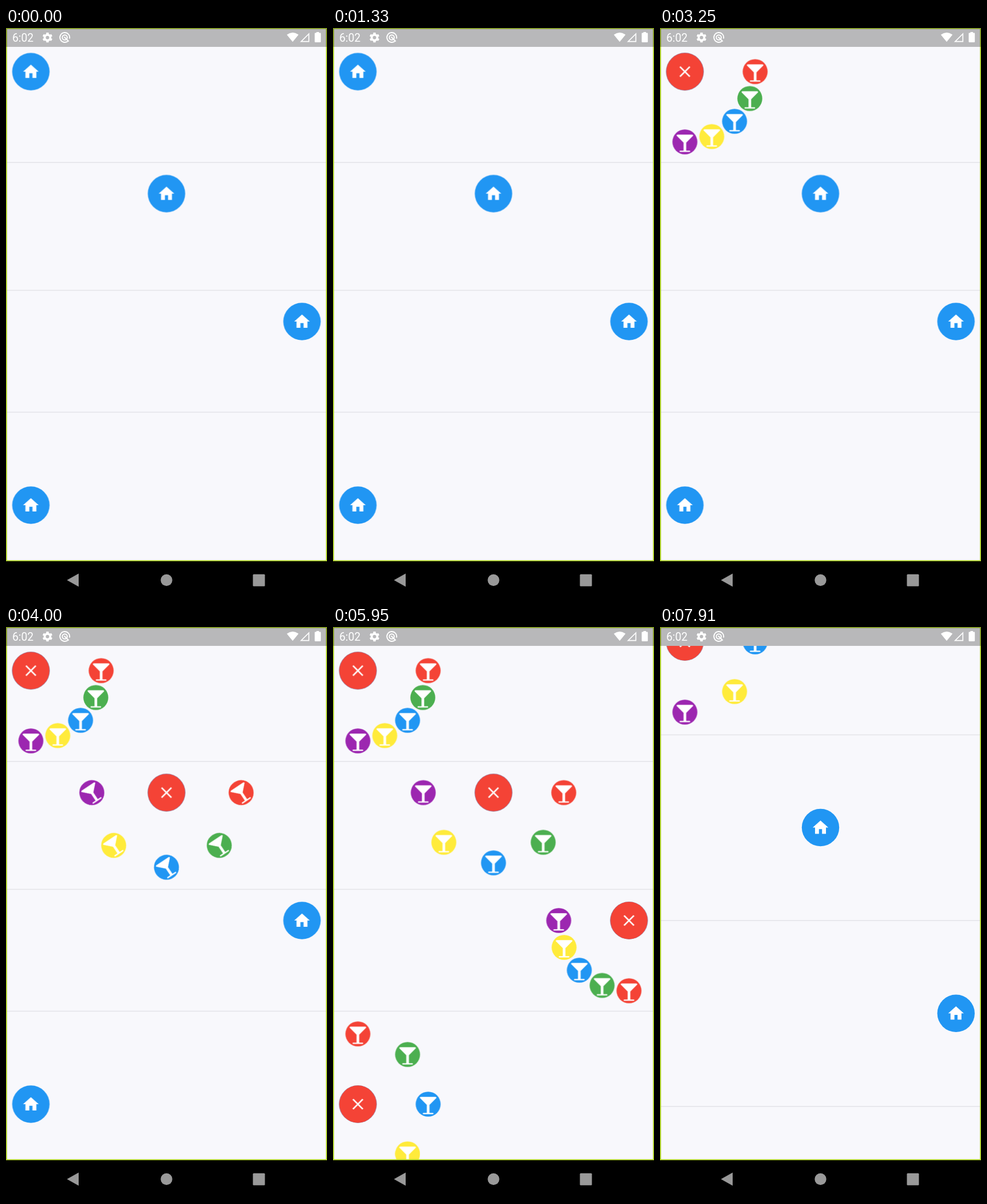
Animation of 561 by 998 pixels, one loop 8 s. Source, as an HTML page:

```html
<!DOCTYPE html>
<html lang="en">
<head>
<meta charset="utf-8">
<title>Circular menus</title>
<style>
  html, body { margin: 0; width: 100%; height: 100%; overflow: hidden; background: #000; }
  svg { display: block; width: 561px; height: 998px; }
  .scroll { animation: scroll 8s infinite; }
  @keyframes scroll {
    0%, 89% { transform: translateY(0); animation-timing-function: cubic-bezier(.4, .1, .45, 1); }
    98.9%, 100% { transform: translateY(-808px); }
  }
</style>
</head>
<body>
<svg viewBox="0 0 561 998">
  <defs>
    <clipPath id="view"><rect y="33" width="561" height="899"/></clipPath>
    <g id="home">
      <circle r="32.7" fill="#2196f3"/>
      <path transform="scale(1.364) translate(-12 -12)" fill="#fff" d="M10 20v-6h4v6h5v-8h3L12 3 2 12h3v8z"/>
    </g>
    <g id="close">
      <circle r="32.7" fill="#f44336"/>
      <path d="M-8.6-8.6 8.6 8.6M8.6-8.6-8.6 8.6" stroke="#fff" stroke-width="2.7"/>
    </g>
    <path id="glass" transform="scale(1.168) translate(0 -13)" fill="#fff"
      d="M-11 2H11Q13.5 2.7 11.8 4.2L2 14V26H7a1 1 0 0 1 0 2H-7a1 1 0 0 1 0-2H-2V14L-11.8 4.2Q-13.5 2.7-11 2Z"/>
  </defs>

  <rect width="561" height="932" fill="#f8f8fc"/>
  <g clip-path="url(#view)"><g class="scroll" id="list"></g></g>

  <rect width="561" height="33" fill="#b8b8ba"/>
  <g id="status" fill="#fff">
    <text x="11" y="23.8" font-size="19.3" font-family="Roboto, sans-serif">6:02</text>
    <g transform="translate(72.5 16.7)">
      <circle r="4.9" fill="none" stroke="#fff" stroke-width="3.8"/>
      <path d="M0-8.6V-5M0 8.6V5M7.5-4.3 4.4-2.5M-7.5 4.3-4.4 2.5M-7.5-4.3-4.4-2.5M7.5 4.3 4.4 2.5" stroke="#fff" stroke-width="4.2"/>
    </g>
    <g transform="translate(102.7 16.5)" fill="none" stroke="#fff" stroke-width="1.9">
      <path d="M5.5 6.5A8.5 8.5 0 1 1 8.3 2"/>
      <circle r="4.3"/>
      <path d="M-1-1 7 7"/>
    </g>
    <path d="M501 24.2 490.8 11.8Q501 4.4 511.2 11.8Z"/>
    <path d="M529.3 10.2V23.6H515.8Z" fill="none" stroke="#fff" stroke-width="1.7"/>
    <path d="M542.5 8.5V7h4.5v1.5h2q1.2 0 1.2 1.2v14q0 1.2-1.2 1.2h-8.300q-1.200 0-1.200-1.200v-14q0-1.200 1.200-1.200z"/>
  </g>

  <path d="M.9 33V931.200H560.100V33" fill="none" stroke="#acd022" stroke-width="1.800"/>
  <path d="M.9 33V.9H560.100V33" fill="none" stroke="#809a1c" stroke-width="1.800"/>

  <rect y="932.500" width="561" height="65.500" fill="#000"/>
  <g fill="#999">
    <path d="M106.500 965 127 953.500V976.500Z"/>
    <circle cx="280.500" cy="965" r="10.200"/>
    <rect x="431.500" y="954.700" width="21" height="21" rx="1.500"/>
  </g>
</svg>
<script>
  const LOOP = 8000, OPEN = 750, RADIUS = 122.8;
  const COLORS = ['#f44336', '#4caf50', '#2196f3', '#ffeb3b', '#9c27b0'];
  // x, y, first angle, last angle, opening time
  const MENUS = [
    [43.5, 76.3, 0, 90, 2130],
    [280.5, 289.500, 0, 180, 3326],
    [517.300, 513, 90, 180, 4307],
    [43.5, 834, -90, 90, 5200],
    [280.5, 1158.500],
    [517.300, 1483.300]
  ];
  const LINES = [235, 458.500, 671.500, 996.500, 1321, 1646];

  const pct = ms => ms / LOOP * 100 + '%';
  const anim = name => `style="animation:${name} ${LOOP}ms infinite`;
  let css = '';

  function menu([x, y, from, to, start], i) {
    const at = body => `<g transform="translate(${x} ${y})">${body}</g>`;
    if (start === undefined) return at('<use href="#home"/>');
    const pose = (r, turn) =>
      `transform: rotate(var(--a)) translateX(${r}px) rotate(calc(${turn}deg - var(--a)))`;
    css += `
      @keyframes open${i} {
        0%, ${pct(start)} { ${pose(0, 540)}; animation-timing-function: cubic-bezier(.68, -.55, .265, 1.55) }
        ${pct(start + OPEN)}, 100% { ${pose(RADIUS, 0)} }
      }
      @keyframes flip${i} {
        0% { opacity: 0; animation-timing-function: step-end }
        ${pct(start)}, 100% { opacity: 1 }
      }`;
    const items = COLORS.map((color, k) => {
      const angle = from + (to - from) * k / (COLORS.length - 1);
      return `<g ${anim('open' + i)};--a:${angle}deg">
        <circle r="21.8" fill="${color}"/><use href="#glass"/></g>`;
    }).join('');
    return at(`${items}<use href="#home"/><use href="#close" ${anim('flip' + i)}"/>`);
  }

  const lines = LINES.map(y => `<path d="M0 ${y}H561" stroke="#e3e3e8" stroke-width="1.3"/>`);
  document.getElementById('list').innerHTML = lines.join('') + MENUS.map(menu).join('');
  const sheet = document.createElement('style');
  sheet.textContent = css;
  document.head.append(sheet);
</script>
</body>
</html>
```
